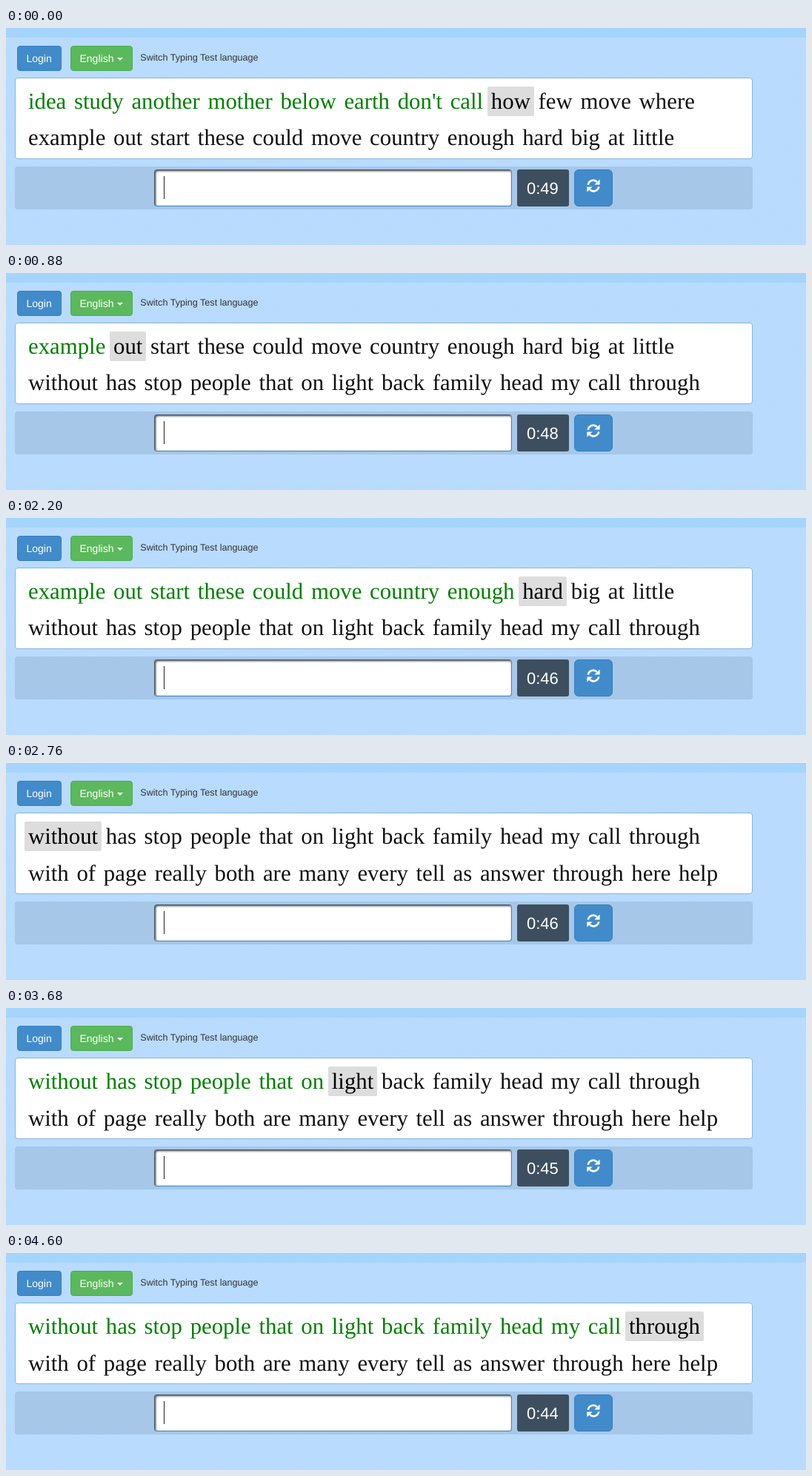
An HTML page for the animation above (4.64 s loop, 1080x293 px).

```html
<!DOCTYPE html>
<html lang="en">
<head>
<meta charset="utf-8">
<title>Typing test</title>
<style>
  html, body { margin: 0; width: 100%; height: 100%; overflow: hidden; }
  body {
    position: relative;
    background: repeating-linear-gradient(45deg, #bbddff 0 1.414px, #b6d9fd 1.414px 2.828px);
    text-rendering: geometricPrecision;
  }
  #band {
    position: absolute; inset: 0 0 auto; height: 13px;
    background: repeating-linear-gradient(45deg, #a8d7ff 0 1.414px, #a2d2fb 1.414px 2.828px);
  }
  svg { position: absolute; left: 0; top: 0; }
  svg text { font-family: "Liberation Sans", Arial, sans-serif; fill: #fff; white-space: pre; }
  svg #typed { font: 27.5px "Liberation Serif", Times, serif; fill: #333; }
  #field {
    position: absolute; left: 200px; top: 191px; width: 483px; height: 50px;
    box-sizing: border-box; border: 1px solid #428bca; border-radius: 4px;
    border-top-color: #47596b; border-left-color: #47596b;
    background: #fff; box-shadow: inset 1px 1px 3px #333;
  }
  .line {
    position: absolute; left: 30px; white-space: pre; color: #111;
    font: 30.8px/34px "Liberation Serif", Times, serif; word-spacing: 3px;
  }
  .done { color: #008000; }
  .now { color: #000; background: #ddd; padding: 3px 5px; margin: 0 -5px; border-radius: 2px; }
</style>
</head>
<body>
<div id="band"></div>
<svg width="1080" height="293" viewBox="0 0 1080 293">
  <rect x="15.5" y="24.5" width="59" height="33" rx="3.5" fill="#428bca" stroke="#357ebd"/>
  <text x="27.5" y="46" font-size="14">Login</text>
  <rect x="87.5" y="24.5" width="83" height="33" rx="3.5" fill="#5cb85c" stroke="#4cae4c"/>
  <text x="99.5" y="46" font-size="14">English</text>
  <path d="M150 40h8l-4 4z" fill="#fff"/>
  <text x="181.3" y="44" font-size="12.6" style="fill:#333">Switch Typing Test language</text>
  <rect x="12.5" y="67.5" width="995" height="109" rx="3.5" fill="#fff" stroke="#8ab4dd"/>
  <rect x="12" y="187" width="996" height="58" rx="4" fill="#a6c7e7"/>
  <rect x="690" y="191" width="70" height="50" rx="3" fill="#3d4f5f"/>
  <text id="clock" x="703" y="224" font-size="22"></text>
  <rect x="767.5" y="191.5" width="51" height="49" rx="5.5" fill="#428bca" stroke="#357ebd"/>
  <g id="refresh" transform="translate(793 213)">
    <g id="arrow">
      <path d="M-7.2 -1.2A7.2 7.2 0 0 1 5 -5.2" fill="none" stroke="#fff" stroke-width="2.6"/>
      <path d="M8.6 -8.6V-1.4H1.4z" fill="#fff"/>
    </g>
    <use href="#arrow" transform="rotate(180)"/>
  </g>
</svg>
<div id="field"></div>
<svg width="1080" height="293" viewBox="0 0 1080 293">
  <text id="typed" x="213" y="225"></text>
  <rect id="caret" x="213" y="200" width="1" height="31" fill="#222"/>
</svg>
<script>
const LOOP = 4640, STEP = 40, FIRST = 8;
const lines = [
  "idea study another mother below earth don't call how few move where",
  "example out start these could move country enough hard big at little",
  "without has stop people that on light back family head my call through",
  "with of page really both are many every tell as answer through here help"
].map(s => s.split(" "));
const words = lines.flat();

// [tick, keys pressed so far]; typing rests on the ticks in rests
const pace = [[0, 0], [14, 16], [22, 27], [38, 45], [55, 69], [69, 88], [92, 120], [115, 151]];
const rests = [3, 6, 9, 12, 32, 36, 41, 61, 66, 75, 80, 99, 106, 113];

const $ = id => document.getElementById(id);
const active = n => n - rests.filter(r => r <= n).length;

function keysAt(n) {
  const i = Math.max(1, pace.findIndex(p => p[0] >= n));
  const [a, ka] = pace[i - 1], [b, kb] = pace[i];
  return Math.floor(ka + (kb - ka) * (active(n) - active(a)) / (active(b) - active(a)));
}

// Every word takes its letters plus one space
function cursorAt(keys) {
  let w = FIRST;
  while (keys > words[w].length) keys -= words[w++].length + 1;
  return { w, typed: words[w].slice(0, keys) };
}

let index = 0;
const spans = [];
const rows = lines.map(list => {
  const el = document.createElement("div");
  el.className = "line";
  const start = index;
  list.forEach((word, i) => {
    const span = document.createElement("span");
    span.textContent = word;
    if (i) el.append(" ");
    el.append(span);
    spans.push(span);
  });
  index += list.length;
  document.body.append(el);
  return { el, start, end: index };
});

function draw(n) {
  const { w, typed } = cursorAt(keysAt(n));
  const top = rows.findIndex(r => w < r.end);
  rows.forEach((r, i) => {
    r.el.style.display = i === top || i === top + 1 ? "" : "none";
    r.el.style.top = (i === top ? 82 : i === 3 ? 132 : 131) + "px";
  });
  spans.forEach((s, i) => s.className = i < w ? "done" : i === w ? "now" : "");
  $("typed").textContent = typed;
  const width = typed ? $("typed").getComputedTextLength() : 0;
  $("caret").setAttribute("x", Math.round(213 + width));
  $("clock").textContent = "0:" + (49 - Math.floor((n + 23) / 24));
}

const begin = performance.now();
let last = -1;
function tick() {
  const n = Math.floor((performance.now() - begin) % LOOP / STEP);
  if (n !== last) draw(last = n);
  requestAnimationFrame(tick);
}
tick();
</script>
</body>
</html>
```
